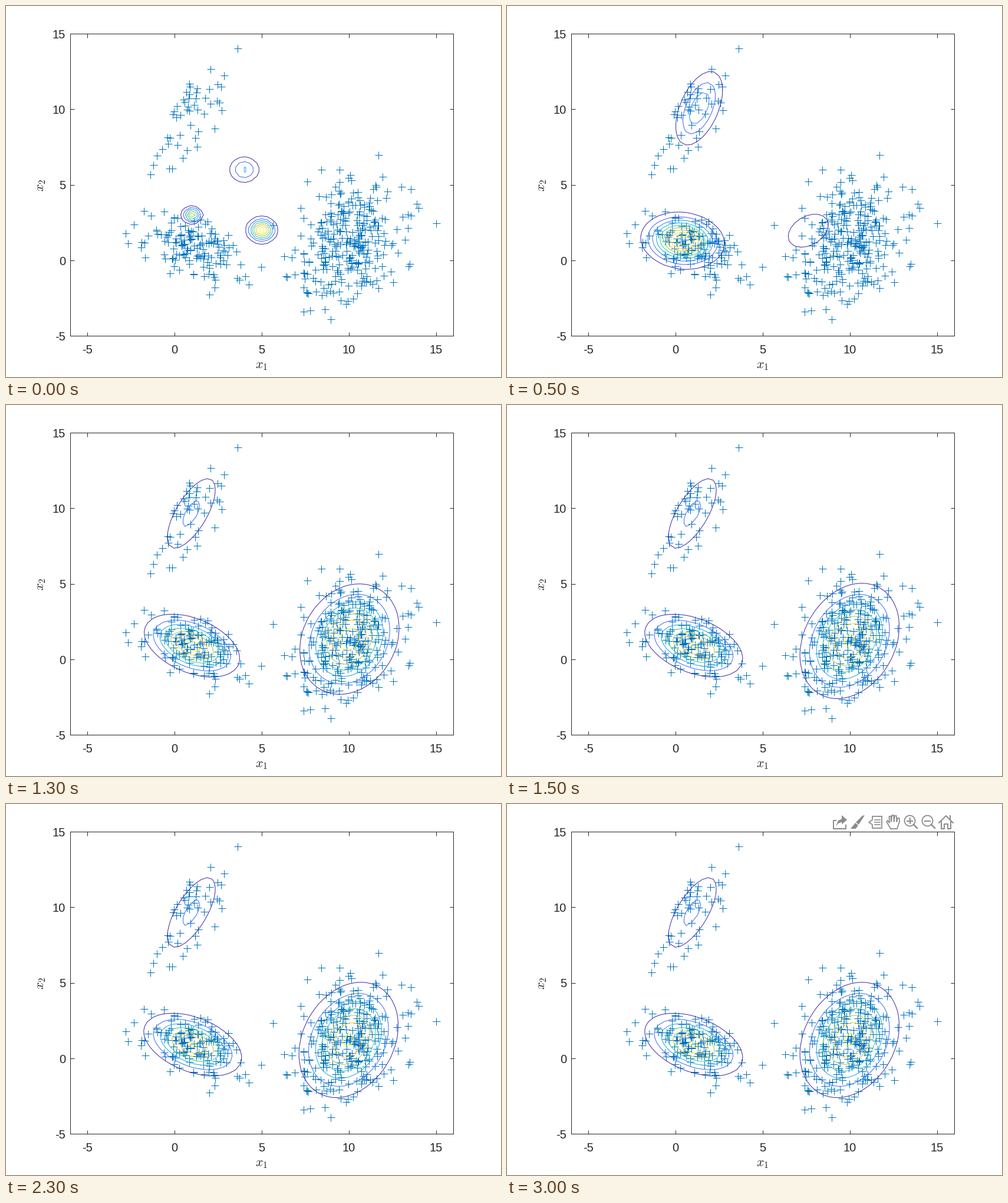
Recreate the animation shown at these times as a matplotlib script. Size 840 by 630 pixels, loop 3.5 s.

```python
import numpy as np
import matplotlib.pyplot as plt
from matplotlib.animation import FuncAnimation
from matplotlib.colors import LinearSegmentedColormap
from matplotlib.patches import Circle, Polygon

W, H = 840, 630
PX = 0.72  # points per pixel at 100 dpi
LEFT, TOP, WIDTH, HEIGHT = 108.6, 46.8, 650.8, 513.45
INK, BLUE, GREY = "#262626", "#0072bd", "#8c8c8c"

plt.rcParams["font.family"] = "Liberation Sans"
plt.rcParams["mathtext.fontset"] = "cm"
plt.rcParams["path.simplify"] = False

parula = LinearSegmentedColormap.from_list("parula", [
    (0.242, 0.150, 0.660), (0.278, 0.356, 0.978), (0.179, 0.529, 0.968),
    (0.069, 0.695, 0.839), (0.216, 0.784, 0.592), (0.504, 0.799, 0.348),
    (0.863, 0.741, 0.160), (0.989, 0.814, 0.189), (0.977, 0.984, 0.081)])

# Each component: weight, mean x, mean y, sd x, sd y, correlation
START = [(w, mx, my, var**0.5, var**0.5, 0) for w, mx, my, var in
         [(0.2, 1, 3, 0.1), (0.5, 5, 2, 0.2), (0.3, 4, 6, 0.3)]]
MOVING = [(0.3, 0.4, 1.3, 1.12, 0.88, -0.1),
          (0.069, 7.61, 1.96, 1.285, 1.22, 0.35),
          (0.126, 1.35, 10.06, 0.81, 1.48, 0.5)]
LOWER = (0.3, 1.04, 0.91, 1.41, 1.04, -0.42)
RIGHT = (0.6, 9.98, 1.22, 1.43, 1.92, 0.25)
UPPER = (0.1, 0.96, 9.65, 1.08, 1.81, 0.69)
NEARLY = [(0.3, 1.0, 0.91, 1.36, 1.03, -0.42),
          (0.6, 10.03, 1.34, 1.41, 1.81, 0.2), UPPER]
# Level spacing and mixture of every EM step
STEPS = [(0.05, START), (0.005, MOVING), (0.005, NEARLY),
         (0.005, [LOWER, RIGHT, UPPER])]

# Lone points far from their cluster
STRAYS = [(5.65, 2.35), (6.4, -1.05), (6.47, -1.1), (15, 2.45), (11.7, 6.95),
          (7.6, 5.2), (8.4, 6), (9.45, 6), (13.9, 3.75), (12.55, -1.45),
          (2, -2.25), (4.95, -0.45), (7.4, -3.4), (8.95, -3.9), (-1.4, 5.7)]


def sample(part, n, rng):
    """Normal points without far tails, matched exactly to mean and spread."""
    _, mx, my, sx, sy, r = part
    z = rng.standard_normal((2 * n, 2))
    z = z[np.hypot(*z.T) < 2.5][:n]
    z -= z.mean(axis=0)
    z = np.linalg.solve(np.linalg.cholesky(np.cov(z.T)), z.T)
    cov = [[sx * sx, r * sx * sy], [r * sx * sy, sy * sy]]
    return (np.linalg.cholesky(cov) @ z).T + (mx, my)


def density(x, y, parts):
    total = 0
    for w, mx, my, sx, sy, r in parts:
        u, v, q = (x - mx) / sx, (y - my) / sy, 1 - r * r
        peak = w / (2 * np.pi * sx * sy * np.sqrt(q))
        total = total + peak * np.exp(-(u * u - 2 * r * u * v + v * v) / (2 * q))
    return total


fig = plt.figure(figsize=(W / 100, H / 100), dpi=100, facecolor="white")
ax = fig.add_axes([LEFT / W, 1 - (TOP + HEIGHT) / H, WIDTH / W, HEIGHT / H])
ax.set(xlim=(-6, 16), ylim=(-5, 15),
       xticks=range(-5, 16, 5), yticks=range(-5, 16, 5))
ax.tick_params(direction="in", length=6.5 * PX, width=PX, color=INK,
               top=True, right=True, labelbottom=False, labelleft=False)
for spine in ax.spines.values():
    spine.set(linewidth=PX, color=INK)

stage = fig.add_axes([0, 0, 1, 1])
stage.set(xlim=(0, W), ylim=(H, 0))
stage.patch.set_alpha(0)
stage.axis("off")

# Labels
for v in range(-5, 16, 5):
    stage.text(LEFT + (v + 6) * WIDTH / 22, 590, str(v), size=20 * PX,
               color=INK, ha="center", va="baseline")
    stage.text(101, TOP + (15 - v) * HEIGHT / 20 + 7.8, str(v),
               size=20 * PX, color=INK, ha="right", va="baseline")
stage.text(434, 615, "$x_1$", size=22 * PX, color=INK,
           ha="center", va="baseline")
stage.text(60, 304, "$x_2$", size=22 * PX, color=INK, rotation=90,
           ha="center", va="center")

# Scatter
rng = np.random.default_rng(12)
data = np.vstack([sample(part, int(490 * part[0]), rng)
                  for part in (LOWER, RIGHT, UPPER)] + [STRAYS])
ax.plot(*data.T, "+", color=BLUE, ms=13 * PX, mew=PX, zorder=2)

# Density contours
gx, gy = np.meshgrid(np.linspace(-6, 16, 71), np.linspace(-5, 15, 71))
contours = []
for gap, parts in STEPS:
    z = density(gx, gy, parts)
    levels = gap * np.arange(1, int(z.max() / gap) + 1)
    contours.append(ax.contour(gx, gy, z, levels, cmap=parula,
                               vmin=levels[0], vmax=levels[-1],
                               linewidths=PX, zorder=3))

# Toolbar
tools = []


def stroke(points, width=2.0):
    tools.extend(stage.plot(*zip(*points), color=GREY, lw=width * PX,
                            solid_joinstyle="round"))


def blob(points):
    tools.append(stage.add_patch(Polygon(points, fc=GREY, ec="none")))


def share():
    stroke([(558, 28), (554, 28), (554, 42), (575, 42), (575, 36)])
    blob([(558, 38), (562, 28), (568, 25.5), (568, 19), (577, 27),
          (568, 34.5), (568, 30.5), (562, 33)])


def brush():
    blob([(607, 19), (597, 35), (592, 31), (603, 20)])
    blob([(591, 32), (596, 36), (592, 42), (583, 42), (588, 36)])


def note():
    stroke([(636, 21), (620, 21), (620, 27), (614, 31), (620, 35), (620, 41),
            (636, 41), (636, 21)], 1.8)
    for y in (27, 31, 35):
        stroke([(624, y), (633, y)], 1.6)


def hand():
    outline = [(651, 42), (644, 30), (646, 28), (649, 32)]
    for k, tip in enumerate((21, 19, 20, 24)):
        x = 650 + 4.7 * k
        outline += [(x - 1.5, tip), (x + 1.5, tip), (x + 2, 30)]
    stroke(outline + [(662, 42), (651, 42)], 1.8)


def lens(cx, plus):
    tools.append(stage.add_patch(Circle((cx, 28.5), 9, fill=False, ec=GREY,
                                        lw=1.8 * PX)))
    stroke([(cx + 6.5, 35), (cx + 12.5, 41)], 2.4)
    stroke([(cx - 4.5, 28.5), (cx + 4.5, 28.5)])
    if plus:
        stroke([(cx, 24), (cx, 33)])


def home():
    stroke([(733, 32), (745, 20), (757, 32)])
    stroke([(737, 29), (737, 42), (742, 42), (742, 34), (748, 34), (748, 42),
            (753, 42), (753, 29)])
    stroke([(752, 26), (752, 20)])


share()
brush()
note()
hand()
lens(683.5, True)
lens(713.5, False)
home()


def update(i):
    shown = min(i, len(STEPS) - 1)
    for k, rings in enumerate(contours):
        rings.set_visible(k == shown)
    for part in tools:
        part.set_visible(i >= 5)
    return contours + tools


anim = FuncAnimation(fig, update, frames=7, interval=500, repeat=True,
                     repeat_delay=0, blit=False)
plt.show()
```
